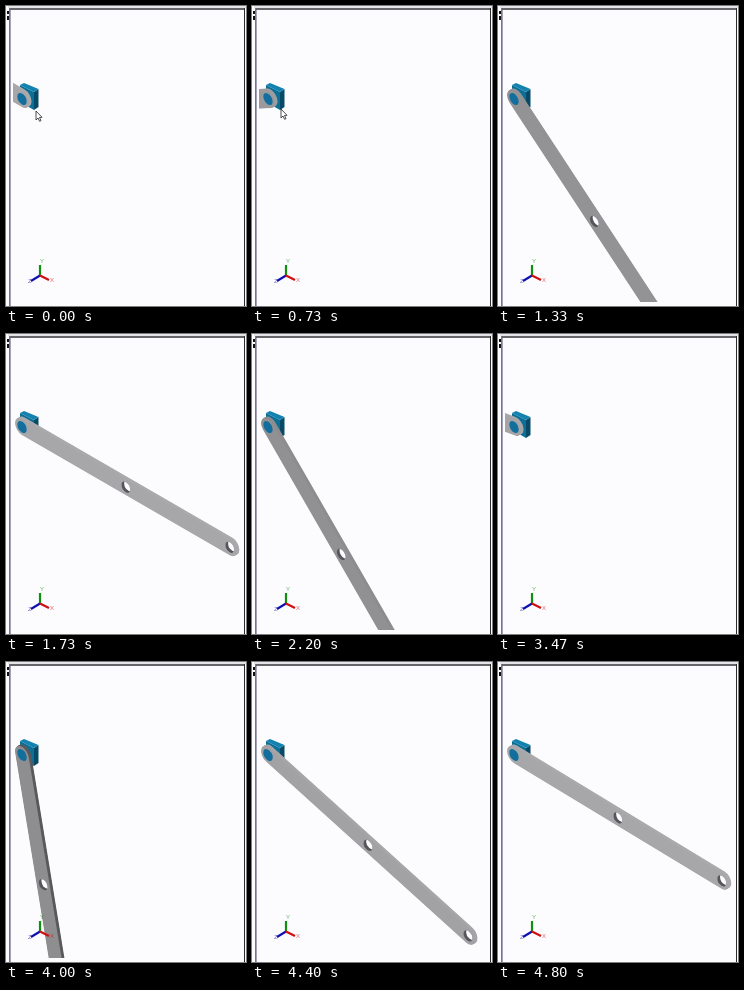
Animation, 240 px wide and 300 px high, one loop 4.87 s. Source, as an HTML page with a canvas:

```html
<!DOCTYPE html>
<html lang="en">
<head>
<meta charset="utf-8">
<title>Swinging bar</title>
<style>
html, body { margin: 0; width: 100%; height: 100%; overflow: hidden; background: #fcfcfe; }
canvas { display: block; }
</style>
</head>
<body>
<canvas id="stage" width="240" height="300"></canvas>
<script>
const ctx = document.getElementById('stage').getContext('2d');
const LOOP = 4870, STEP = 200 / 3, LAST_STEP = 72;
const PIVOT = { x: 16, y: 93 };
const LENGTH = 240, HALF_WIDTH = 8, DEPTH = 3;

// Pendulum time reached at each clock time (ms); the playback speed varies a little.
const PACE = [[0, 0], [336, 0], [733, 1], [1333, 2.526], [2200, 4.977],
              [2933, 6.6], [4000, 9.416], [4800, 11.345], [4870, 11.51]];

function interpolate(points, t) {
  const i = Math.max(1, points.findIndex(p => p[0] >= t));
  const [t0, v0] = points[i - 1], [t1, v1] = points[i];
  return v0 + (v1 - v0) * (t - t0) / (t1 - t0);
}

// Undamped pendulum released from horizontal; angle is measured from straight down.
function swingAngle(time) {
  const steps = Math.ceil(time / 0.005), dt = steps ? time / steps : 0;
  let angle = -Math.PI / 2, speed = 0;
  for (let i = 0; i < steps; i++) {
    const middle = angle + speed * dt / 2;
    speed -= Math.sin(middle) * dt;
    angle = middle + speed * dt / 2;
  }
  return angle;
}

function polygon(color, points) {
  ctx.fillStyle = color;
  ctx.beginPath();
  points.forEach(([x, y]) => ctx.lineTo(x, y));
  ctx.closePath();
  ctx.fill();
}

function rect(color, x, y, w, h) {
  ctx.fillStyle = color;
  ctx.fillRect(x, y, w, h);
}

function axis(color, label, x, y, labelX, labelY) {
  ctx.strokeStyle = color;
  ctx.lineWidth = 2.2;
  ctx.beginPath();
  ctx.moveTo(34, 269.5);
  ctx.lineTo(x, y);
  ctx.stroke();
  ctx.font = '6px "Liberation Sans", Arial, sans-serif';
  ctx.fillStyle = color;
  ctx.globalAlpha = 0.65;
  ctx.fillText(label, labelX, labelY);
  ctx.globalAlpha = 1;
}

const gray = v => `rgb(${v}, ${v}, ${v + 3})`;

// Switches to the isometric plane of the bar, moved back by the given depth.
function enterPlane(depth, angle) {
  ctx.setTransform(0.866, 0.5, 0, 1, PIVOT.x + 0.866 * depth, PIVOT.y - 0.5 * depth);
  ctx.rotate(-angle);
}

function circlePath(y, r) {
  ctx.beginPath();
  ctx.arc(0, y, r, 0, Math.PI * 2);
}

function disc(color, y, r) {
  ctx.fillStyle = color;
  circlePath(y, r);
  ctx.fill();
}

function barShape(color) {
  ctx.fillStyle = color;
  ctx.beginPath();
  ctx.arc(0, 0, HALF_WIDTH, Math.PI, 0);
  ctx.arc(0, LENGTH, HALF_WIDTH, 0, Math.PI);
  ctx.fill();
}

// The inner wall shows where the front and back openings do not overlap.
function hole(angle, y, r) {
  ctx.save();
  enterPlane(0, angle);
  disc('#55555a', y, r);
  ctx.clip();
  enterPlane(DEPTH, angle);
  disc('#fcfcfe', y, r);
  ctx.restore();
}

function drawBracket() {
  polygon('#0b6f98', [[14, 79], [28, 86], [28, 104], [14, 96]]);
  polygon('#084a66', [[28, 86], [32.5, 83], [32.5, 101], [28, 104]]);
  polygon('#1382ae', [[14, 79], [18, 77], [32.5, 83], [28, 86]]);
}

function drawBar(angle) {
  const level = Math.abs(Math.sin(angle));
  const side = gray(Math.round(70 + 100 * level));
  const face = gray(Math.round(142 + 25 * level ** 6));
  ctx.save();
  ctx.beginPath();
  ctx.rect(7, 5, 230, 291);
  ctx.clip();
  for (let d = DEPTH; d > 0; d -= 0.5) {
    enterPlane(d, angle);
    barShape(side);
  }
  enterPlane(0, angle);
  barShape(face);
  hole(angle, LENGTH / 2, 5);
  hole(angle, LENGTH, 5);
  disc('#126f9d', 0, 5.4);
  ctx.restore();
}

function drawAxes() {
  axis('#109010', 'Y', 34, 259, 34, 257);
  axis('#1010b0', 'Z', 25, 275, 22, 277);
  axis('#d01010', 'X', 43, 274, 44, 276);
}

function drawCursor(t) {
  let x, y;
  if (t < 930) {
    const travel = Math.min(1, t / 730);
    x = 30 - travel;
    y = 105 - 2 * travel;
  } else if (t > 2740 && t < 3140) {
    x = 19.5;
    y = 142;
  } else return;
  ctx.save();
  ctx.translate(x, y);
  polygon('#fff', [[0, 0], [0, 9], [2, 7], [3.6, 10.3], [5, 9.6], [3.5, 6.5], [6, 6.3]]);
  ctx.strokeStyle = '#222';
  ctx.lineWidth = 0.8;
  ctx.stroke();
  ctx.restore();
}

function drawWindow() {
  rect('#fcfcfe', 0, 0, 240, 300);
  rect('#e4e4e8', 2, 0, 238, 2);
  rect('#66666a', 3, 2, 236, 2);
  rect('#77777c', 3, 2, 1, 298);
  rect('#a4a4b8', 4, 4, 1, 296);
  rect('#111', 1, 5, 2, 3);
  rect('#111', 1, 10, 2, 4);
  rect('#2a2a2c', 238, 2, 1, 298);
}

function render(now) {
  // Steps begin on the hundredth of a second just before their exact time.
  const step = Math.min(LAST_STEP, Math.floor((now % LOOP + 7) / STEP));
  const t = step * STEP;
  drawWindow();
  drawBracket();
  drawBar(swingAngle(interpolate(PACE, t)));
  drawAxes();
  drawCursor(t);
}

const start = performance.now();
function tick() {
  render(performance.now() - start);
  requestAnimationFrame(tick);
}
tick();
</script>
</body>
</html>
```
